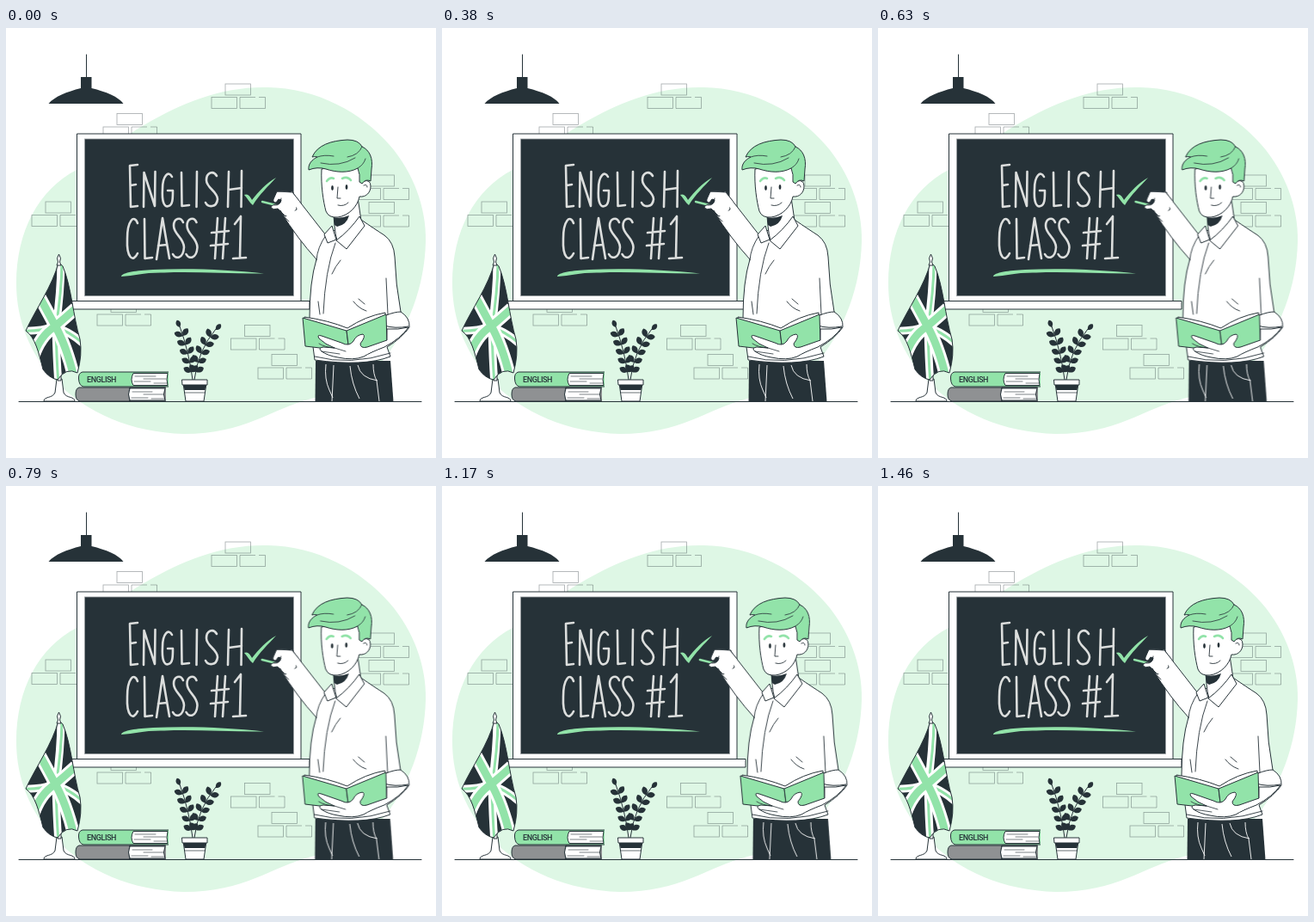
These frames come from a looping animation (500 by 500 pixels, 1.5 s). An HTML page:

```html
<!DOCTYPE html>
<html lang="en">
<head>
<meta charset="utf-8">
<title>English class</title>
<style>
html, body { margin: 0; width: 100%; height: 100%; overflow: hidden; background: #fff; }
svg { display: block; width: 100vw; height: 100vh; }
.ink { fill: #263238; }
.mint { fill: #92e3a9; }
.line { fill: none; stroke: #263238; stroke-linecap: round; stroke-linejoin: round; }
.white { fill: #fff; stroke: #263238; stroke-linejoin: round; }
.cover { fill: #92e3a9; stroke: #263238; stroke-linejoin: round; }
#bricks { fill: none; stroke: #263238; stroke-opacity: .42; stroke-width: .8; }
.chalk { fill: none; stroke: #dcdedd; stroke-width: 2.6; stroke-linecap: round; stroke-linejoin: round; }
.title { font: 500 9px Roboto, sans-serif; letter-spacing: -.4px; fill: #263238; }
</style>
</head>
<body>
<svg viewBox="0 0 500 500">
  <defs>
    <clipPath id="cloth"><path d="M61 273C54 300 35 326 23 352C34 360 38 377 43 397Q50 407 60 409Q70 394 83 401Q89 380 86 362C78 335 76 300 66 277Z"/></clipPath>
  </defs>

  <path fill="#def7e5" d="M82 165C115 150 134 127 162 112C205 87 250 68 304 69C362 70 413 98 446 136C474 168 489 210 488 248C487 300 468 352 434 392C412 418 382 424 355 431C308 443 278 472 207 472C145 470 94 448 57 410C28 379 12 340 12 297C12 236 38 188 82 165Z"/>
  <g id="bricks"></g>

  <g id="lamp">
    <path class="line" d="M93.5 31V58"/>
    <path class="ink" d="M87 57H99.500V70C116 74 131 80 136.500 88H49.500C56 80 71 74 87 70Z"/>
  </g>

  <g id="board">
    <rect class="white" x="82.500" y="123" width="260.500" height="195"/>
    <rect class="ink" x="91.500" y="129" width="243" height="182.500" stroke="#9a9fa2" stroke-width=".8"/>
    <rect class="white" x="73" y="317.500" width="280" height="9.500"/>
    <g class="chalk" role="img" aria-label="English class #1">
      <path d="M153 159L144 160L145 208L153 207M145 183L151 182"/>
      <path d="M160 208L160.500 168L173 207L173.500 167"/>
      <path d="M193 173C189 165 182 172 182 187C181 202 184 209 189 207C194 206 194 198 194 189H188"/>
      <path d="M204 168L204.500 207L213 206M222 167L221.500 208"/>
      <path d="M245 172C241 165 233 168 233 177C233 186 246 190 246 199C245 209 235 209 232 203"/>
      <path d="M259 167L258 208M274 166L273.500 208M259 188L274 186"/>
      <path d="M153 227C149 216 141 224 141 245C140 268 148 273 153 262"/>
      <path d="M161 222L161.500 268L170 267M175 269L182 221L190 268M177 253L187 252"/>
      <path id="s" d="M206 226C203 219 195 221 195 230C195 240 207 244 207 255C206 269 197 269 194 263"/>
      <use href="#s" x="15.500"/>
      <path d="M246 221L243 268M255 221L252 268M239 238L259 236M238 253L258 251M266 228L273 219L272 267M264 268L279 267"/>
    </g>
    <path class="mint" d="M134 289C135 284 152 282 171 281C214 279 260 281 300 285.500C262 286 220 283 184 284.500C160 284 150 288 134 289Z"/>
    <path class="mint" d="M277 194C281 192 284 196 286 200C294 190 303 180 314 174C305 184 295 193 287 206C283 203 281 198 277 194Z"/>
  </g>

  <g id="flag">
    <path class="white" d="M44 434C44 428 54 431 57 424L59 408H65L67 424C70 431 80 428 80 434Z"/>
    <path class="white" d="M60 277V410H64V277Z"/>
    <g clip-path="url(#cloth)">
      <path class="ink" d="M20 265H92V415H20Z"/>
      <g fill="none" stroke="#fff">
        <path stroke-width="9" d="M64 270Q64 305 58 348Q59 390 61 414M18 352Q40 353 56 347Q76 354 91 368"/>
        <path stroke="#92e3a9" stroke-width="3" d="M65 270Q65 305 58 348Q59 390 61 414M18 352Q40 353 56 347Q76 354 91 368"/>
        <path stroke-width="15" d="M36 307Q49 331 57 346Q70 369 79 406M31 384Q39 358 57 347Q70 336 81 326"/>
        <path stroke="#92e3a9" stroke-width="9" d="M36 307Q49 331 57 346Q70 369 79 406M31 384Q39 358 57 347Q70 336 81 326"/>
      </g>
    </g>
    <path class="line" d="M61 273C54 300 35 326 23 352C34 360 38 377 43 397Q50 407 60 409Q70 394 83 401Q89 380 86 362C78 335 76 300 66 277Z"/>
    <path class="white" d="M61.500 263Q65 268 62.500 272L64 276H59L60.500 272Q58 268 61.500 263Z"/>
  </g>

  <g id="books">
    <path class="white" d="M144 418H185V433H144Z"/>
    <path fill="#8f9193" stroke="#263238" d="M186 418H85Q81 419 81 426Q81 433 86 434H186M144 418Q141 426 144 434Z"/>
    <path class="white" d="M144 419H185Q182 426 185 433H144Q141 426 144 419Z"/>
    <path class="cover" d="M189 400H89Q84 401 84.500 408Q85 416 90 417H189"/>
    <path class="white" d="M148 401.500H188Q186 409 188 415.500H148Q144 409 148 401.500Z"/>
    <path class="line" stroke-width=".6" d="M150 405H174M160 408H186M149 411H168M172 413H187M147 423H170M160 426H183M146 430H165M169 431H184"/>
    <text class="title" x="94" y="411.700">ENGLISH</text>
  </g>

  <g id="plant">
    <path class="line" d="M217 409Q213 377 202 347M219 409Q223 375 244 350"/>
    <g id="leaves" class="ink"></g>
    <path class="white" d="M206 413H233L230 434H209Z"/>
    <path class="ink" d="M206.500 415H232.500L231.500 421H207.500Z"/>
    <path class="white" d="M204.500 409H234V415H205Z"/>
    <path class="line" stroke-width=".7" d="M208 424H231"/>
  </g>

  <g id="teacher">
    <path class="ink" d="M360 387H447L450.500 434.500H359.500Z"/>
    <path fill="none" stroke="#fff" stroke-width=".9" d="M372 391Q370 408 376 421L380 430M381 392L379 434M409 392Q412 407 432 410M427 391Q427 403 431 410L434 434M400 393Q402 414 411 431"/>

    <path class="white" d="M333 191L372 241L398 226L413 223Q429 234 440 241Q451 249 452 266Q453 298 459 330Q470 337 469 348Q461 360 443 371L447 382Q416 394 359 386L356 363L353 337Q353 295 361 269Q339 245 319 213Z"/>
    <path class="line" d="M372 241Q362 255 361 270M383 250Q371 282 369 332M442 291L444 333M359 382Q400 393 447 378M404 318Q410 326 419 329M410 315L417 321M389 270Q383 277 379 286M363 318L365 333" stroke-width=".9"/>
    <path class="line" d="M442 334Q452 330 459 330M440 346Q452 350 468 347"/>

    <path class="white" d="M380 207L382 230Q383 241 385 247L413 224L409 197Z"/>
    <path class="ink" d="M381 220Q389 222 399 218Q396 229 385 231L382 229Z"/>
    <path class="white" d="M379 230L370 240L374 250L384 246Z"/>
    <path class="white" d="M411 219L417 230L396 257L384 247Q400 235 411 219Z"/>

    <path class="white" d="M367 164C366 183 369 202 372 213Q375 221 386 220C399 218 409 207 411 196C419 197 424 191 424 184Q424 176 416 178L412 156Z"/>
    <path class="line" d="M416 183Q420 181 420 185M386 185L385 198H389M386 206Q393 208 398 203" stroke-width=".9"/>
    <g class="ink"><ellipse cx="379.500" cy="186" rx="1.400" ry="3"/><ellipse cx="396" cy="185" rx="1.400" ry="3"/></g>
    <path fill="none" stroke="#92e3a9" stroke-width="2.600" stroke-linecap="round" d="M373 178Q377 173 381 175M391 175Q397 172 401 177"/>
    <path class="cover" d="M352 165C351 158 356 153 362 150Q358 149 356 150C362 136 378 131 397 130Q410 130 414 138C423 142 427 152 425 164L424 178Q418 175 414 181L411 179Q412 170 409 163C398 169 384 168 372 164Q362 161 352 165Z"/>
    <path class="line" stroke-width=".8" d="M362 150Q370 147 381 149M366 157Q388 162 406 151M397 150Q410 148 414 138M409 163Q416 159 418 152"/>

    <path d="M298 202L314 206" fill="none" stroke="#263238" stroke-width="3.800" stroke-linecap="round"/>
    <path d="M298 202L314 206" fill="none" stroke="#92e3a9" stroke-width="2.400" stroke-linecap="round"/>
    <path class="white" d="M334 191Q325 189 315 190L311 199Q310 203 314 203L317 199L320 200Q319 206 313 205Q308 206 308 209Q311 212 316 210L325 219L338 211Z"/>
    <path fill="#fff" d="M332 190L341 201L331 223L320 212Z"/>
    <path class="line" d="M315 190L333 191L341 201M319 212Q323 220 329 225M320 198Q320 207 312 206" stroke-width=".9"/>

    <path class="white" d="M347 336Q375 340 397 349Q418 335 441 331V338L397 357L347 342Z"/>
    <path class="cover" d="M345 337L396 352L399 376L348 370Z"/>
    <path class="cover" d="M396 352L442 333L443 367L399 376Z"/>
    <path class="white" d="M468 348Q459 361 440 371Q424 377 416 382Q404 387 386 383Q374 381 367 376Q362 372 369 371L382 372Q371 368 364 361Q361 356 367 358L390 366Q399 371 404 364Q407 357 415 356Q419 358 412 367Q412 373 420 371L443 363V350Q456 351 468 348Z"/>
    <path class="line" stroke-width=".8" d="M382 372L395 376M367 376L388 379M364 367Q370 371 382 372"/>
  </g>

  <path class="line" d="M15 434.500H483"/>
</svg>
<script>
const $ = id => document.getElementById(id);

function add(parent, tag, attrs) {
  const node = document.createElementNS("http://www.w3.org/2000/svg", tag);
  for (const key in attrs) node.setAttribute(key, attrs[key]);
  parent.append(node);
}

// Each cluster: one brick above two, the last one with a worn edge.
const clusters = [[255, 65], [129, 99.5], [46, 202], [422, 171], [422, 202.5], [122, 317.5], [277.5, 345.5], [309, 379.5]];
for (const [x, y] of clusters) {
  [[0, 0], [-16, 15.5], [17, 15.5]].forEach(([dx, dy], i) => add($("bricks"), "rect", {
    x: x + dx, y: y + dy, width: 29.5, height: 13,
    "stroke-dasharray": i === 2 ? "18 4 70 0" : "none"
  }));
}

// Paired leaves along a quadratic stem.
function sprout([x0, y0], [cx, cy], [x1, y1], pairs) {
  const leaf = (x, y, deg, size) => add($("leaves"), "path", {
    d: "M0 0C-5 -4 -4 -9 0 -11C4 -9 5 -4 0 0Z",
    transform: `translate(${x} ${y}) rotate(${deg}) scale(${size})`
  });
  for (let i = 0; i <= pairs; i++) {
    const t = .14 + .86 * i / pairs, u = 1 - t;
    const x = u * u * x0 + 2 * u * t * cx + t * t * x1;
    const y = u * u * y0 + 2 * u * t * cy + t * t * y1;
    const dx = u * (cx - x0) + t * (x1 - cx), dy = u * (cy - y0) + t * (y1 - cy);
    const deg = Math.atan2(dx, -dy) * 180 / Math.PI;
    if (i === pairs) leaf(x, y, deg, .8);
    else for (const side of [-1, 1]) leaf(x, y, deg + side * 52, .95);
  }
}
sprout([217, 409], [213, 377], [202, 348], 5);
sprout([219, 409], [223, 375], [244, 351], 5);

// Sideways shake: [progress, x offset].
const shake = [[0, 0], [.1, -1], [.2, 2], [.3, -4], [.4, 4], [.5, -4], [.6, 4], [.7, -4], [.8, 2], [.9, -1], [1, 0]];
const unit = 500;
const teacher = $("teacher");
teacher.animate(
  shake.map(([offset, x]) => ({ offset, transform: `translate(${x * unit / 500}px, 0)`, easing: "ease" })),
  { duration: 1500, iterations: Infinity }
);
</script>
</body>
</html>
```
